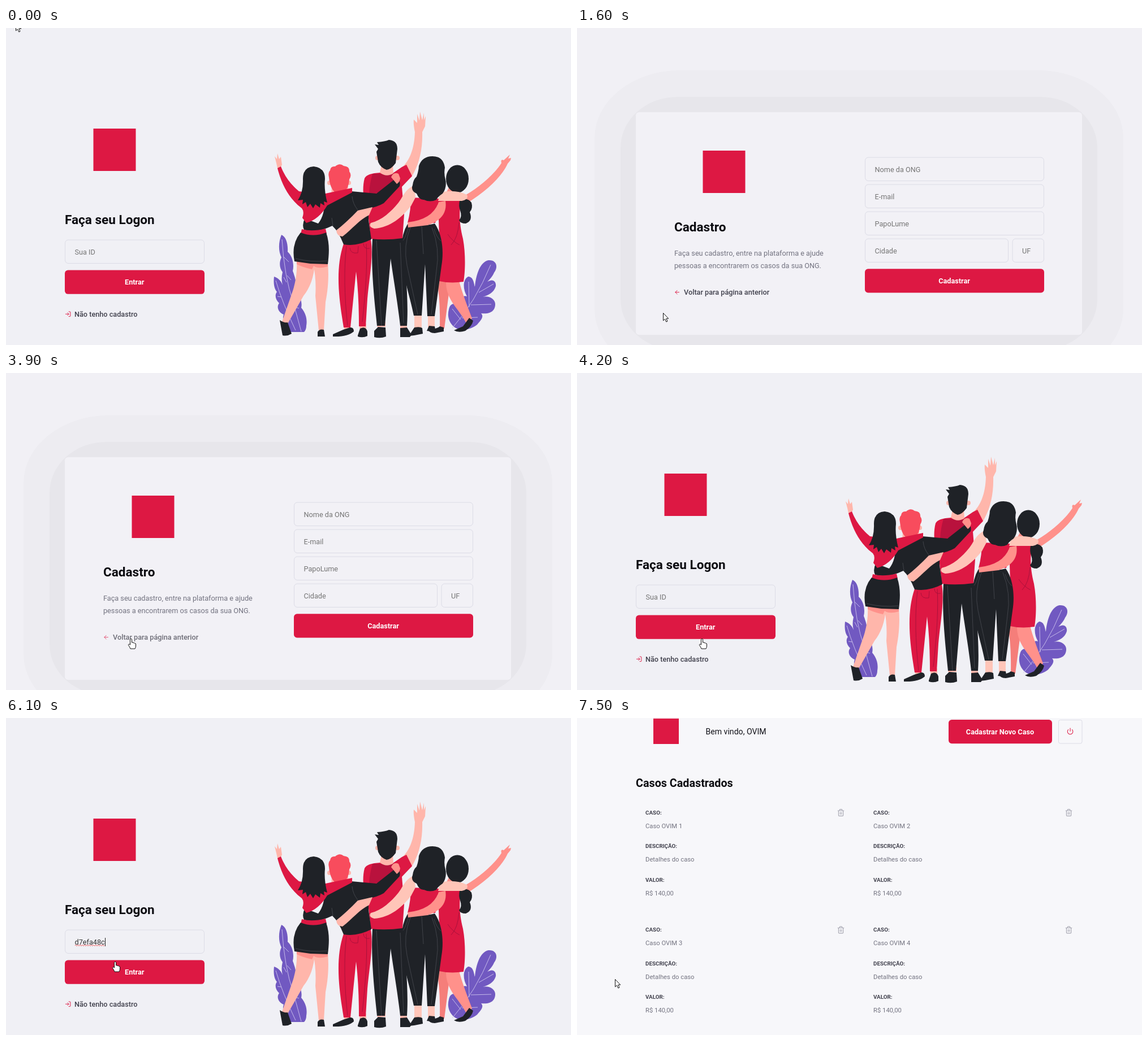
An HTML page that plays this animation: 999 by 561 pixels, repeating every 8000 ms.

```html
<!DOCTYPE html>
<html lang="pt-BR">
<head>
<meta charset="utf-8">
<title>Logon</title>
<style>
html, body { margin: 0; width: 100%; height: 100%; overflow: hidden; background: #f0f0f5; }
svg { display: block; }
text { font: 12.68px Roboto, sans-serif; fill: #737380; white-space: pre; }
.title { font-size: 22.54px; font-weight: 700; fill: #0b0b10; }
.link text { font-weight: 500; fill: #41414d; }
.btn text { font-weight: 700; fill: #fff; text-anchor: middle; }
.hint { fill: #757575; }
.label { font-size: 9.86px; font-weight: 700; fill: #41414d; }
.value { font-size: 11.27px; }
.field { fill: none; stroke: #dcdce6; }
.red { fill: #dd1843; }
.ink { fill: #1f2227; }
.pink { fill: #ffb6ab; }
.light { fill: #ffc5b8; }
.coral { fill: #ff918b; }
.leaf { fill: #7159c1; }
.icon { fill: none; stroke: #dd1843; stroke-width: 2; stroke-linecap: round; stroke-linejoin: round; }
.vein, .seam, .fold { fill: none; stroke: #cfc4ee; stroke-width: .9; }
.seam { stroke: #44474d; }
.fold { stroke: #a5103a; }
</style>
</head>
<body>
<svg width="999" height="561" viewBox="0 0 999 561">
<rect id="bg" width="999" height="561"/>

<g id="login">
  <rect class="red" x="154.5" y="178" width="75" height="75"/>
  <text class="title" x="104" y="347">Faça seu Logon</text>
  <rect class="field" x="104.5" y="375" width="246" height="41.5" rx="5.6"/>
  <text id="idText" x="121.5" y="400.5"></text>
  <path id="wave" fill="none" stroke="#e33" stroke-width=".9"/>
  <rect id="caret" y="389" width="1" height="15" fill="#222"/>
  <g class="btn" id="enter">
    <rect class="red" x="104" y="428.6" width="247" height="42.2" rx="5.6"/>
    <text x="227.3" y="454">Entrar</text>
  </g>
  <g class="link" id="signup">
    <path class="icon" transform="translate(104 500.6) scale(.47)" d="M15 3h4a2 2 0 0 1 2 2v14a2 2 0 0 1-2 2h-4M10 17l5-5-5-5M15 12H3"/>
    <text x="121" y="511">Não tenho cadastro</text>
  </g>

  <!-- leaves -->
  <path class="leaf" d="M487 366C495 369 499 382 498 396C506 403 510 417 507 430C512 443 515 456 514 470C521 476 524 486 522 495C530 504 533 516 531 527Q531 534 527 538H503C494 530 487 518 491 507C481 503 478 493 483 487C476 480 475 472 479 467C473 460 473 448 474 440C481 442 487 448 489 455Q486 444 489 432C483 424 483 414 487 406C481 394 482 378 487 366Z"/>
  <path class="vein" d="M488 374Q492 440 508 486L522 537M477 447Q488 485 512 535M491 405l9 9M497 438l7 8M505 472l7 2M496 450l-5-9M508 493l10 3M487 476l-7-1"/>
  <path class="leaf" d="M783 498C786 484 797 487 803 493C800 480 808 472 815 475C807 461 808 445 817 440C826 440 827 450 829 458C831 437 838 414 853 411C867 410 871 422 863 433C860 440 856 444 851 449C861 443 867 448 866 457C863 468 853 473 843 476C855 473 866 481 865 490C864 505 850 506 840 505C846 511 839 518 833 525C820 536 800 536 791 528C783 520 780 510 783 498Z"/>
  <path class="vein" d="M789 531Q830 485 857 419M819 494L818 449M836 468L862 453M822 490L858 489M804 516L789 497M806 513L834 512"/>

  <!-- woman in the dress -->
  <path class="coral" d="M806 299C832 286 862 261 876 239Q874 231 880 234L891 224L888 231L893 230L892 234L887 240C878 261 850 289 815 310Z"/>
  <path fill="#f57e7a" d="M762 447H786L775 532H767Q768 480 762 447Z"/>
  <path class="coral" d="M778 447H801C806 467 815 490 824 514L814 523C801 496 777 482 778 447Z"/>
  <path class="ink" d="M747 531Q758 535 767 528L774 530V537L758 540Q746 540 747 531ZM792 535L808 528L819 513L826 518Q824 528 812 536Q800 540 792 535Z"/>
  <path class="red" d="M764 306L805 304C801 325 801 345 808 373C813 400 812 431 809 449Q782 453 757 446C767 424 770 399 766 370Z"/>
  <path class="fold" d="M801 344Q799 372 787 384M781 365Q790 378 802 384"/>
  <path class="ink" d="M802 306Q815 298 823 309Q826 319 820 326Q826 341 813 346Q803 346 801 340Q807 334 803 323Q800 315 802 306Z"/>
  <path class="coral" d="M784 280L801 288L807 303H773Z"/>
  <ellipse class="ink" cx="798" cy="267" rx="20" ry="24.5"/>

  <!-- tall man -->
  <path class="pink" d="M698 249C714 235 722 214 723 184Q720 170 721 162L727 168L727 152L731 164L732 148L736 163L739 150V163L742 156L741 174L736 184C737 218 729 245 716 265Z"/>
  <path class="pink" d="M656 529h15v-9h-15zM697 531h12v-9h-12z"/>
  <path class="ink" d="M648 372H703C706 430 712 480 709 527H697C693 490 686 450 680 408L670 527H656C650 470 645 420 648 372ZM651 536L658 529L671 530L672 546Q662 550 651 547ZM697 531L709 530L717 543L714 547H697Z"/>
  <path class="seam" d="M655 376L664 527M697 380L703 522"/>
  <path class="red" d="M634 266Q638 257 662 256L684 257L700 246L708 242L718 262L700 281L704 330L701 372Q672 376 645 373L640 328C632 310 629 285 634 266Z"/>
  <path fill="#b9123d" d="M648 258L688 257L692 274L652 294L642 293Q643 275 648 258Z"/>
  <path class="pink" d="M664 242H684L685 257Q673 265 661 256Z"/>
  <circle class="pink" cx="657" cy="230" r="4"/><circle class="pink" cx="692" cy="230" r="4"/>
  <path class="ink" d="M652 206L659 207L656 202Q670 201 677 198Q692 199 692 214L689 239Q681 250 673 251Q662 247 658 237L655 219L658 214Z"/>

  <!-- red-haired man -->
  <path class="pink" d="M598 534h11v-9h-11zM625 532h12v-9h-12z"/>
  <path class="red" d="M597 382L645 374C650 405 642 444 639 479L636 528H624C624 496 623 465 619 431L609 530H597C591 492 580 430 597 382Z"/>
  <path class="fold" d="M602 386Q595 445 604 527M608 389Q609 400 622 398L623 386M637 382Q640 430 630 520M632 381Q632 392 643 390"/>
  <path class="ink" d="M578 542L596 534L608 530Q615 529 615 537Q604 547 578 546ZM622 544L626 532Q636 527 639 537V545Q631 549 622 546Z"/>
  <path class="pink" d="M576 280H605V296H575Z"/>
  <circle class="pink" cx="572" cy="274" r="4"/><circle class="pink" cx="606" cy="274" r="4"/>
  <path fill="#f84c5d" d="M571 264Q569 256 573 252Q574 244 582 245Q590 238 597 244Q608 245 607 254Q612 260 607 268Q606 284 597 291Q589 294 582 291Q573 284 571 264Z"/>
  <path class="ink" d="M563 305L611 289L655 293L688 267Q699 269 696 280L668 310Q656 317 641 319L641 340L646 374Q621 387 597 383Q588 360 577 350Q548 364 527 357Q523 350 528 337L552 346Q564 331 563 305Z"/>
  <path class="seam" d="M622 322Q613 311 612 298M576 336L578 350"/>
  <path class="coral" d="M681 264Q685 254 694 258L697 266Q696 273 691 276Z"/>
  <path class="pink" d="M622 323L648 317L642 331C625 339 612 356 595 369Q585 369 584 358Q602 344 622 323Z"/>

  <!-- woman in the skirt -->
  <path class="pink" d="M480 248L478 239L475 227L479 232L480 222L483 232L486 228L488 242L485 248Z"/>
  <path class="pink" d="M514 411L546 416C545 440 537 461 526 474L497 525L488 520L504 474C512 452 515 435 514 411ZM543 416H569C572 448 567 475 565 485L562 535H553L547 474Q549 445 543 416Z"/>
  <path class="coral" d="M514 411L569 415V422Q552 427 544 421L541 427Q526 424 514 418Z"/>
  <path class="ink" d="M484 517Q491 522 498 521L505 541Q497 546 489 544ZM551 538Q554 532 562 534L564 546H551Z"/>
  <path class="red" d="M480 248L486 245Q496 271 518 289L560 294L612 283V291L568 314Q553 339 531 345L524 336Q528 325 523 319Q492 296 480 248ZM523 356Q541 361 565 355L567 364Q544 371 521 365Z"/>
  <path class="ink" d="M521 362Q543 371 566 362C573 382 571 401 569 418L538 417L510 413Q504 382 521 362Z"/>
  <path class="seam" d="M512 408Q540 415 568 412"/>
  <path class="ink" d="M525 267Q525 246 544 245Q564 247 564 267Q562 286 568 309L562 307L563 314L556 310L555 318L547 312L543 319L538 311L533 317L530 308L524 312L525 304L516 305Q526 290 525 267Z"/>

  <!-- long-haired woman -->
  <path class="light" d="M722 508h13v23h-13zM746 508h12v22h-12z"/>
  <path class="ink" d="M712 545L722 530Q732 528 736 531L737 541Q724 544 712 545ZM744 536L748 527L758 528L760 538Z"/>
  <path class="red" d="M716 300L766 302Q765 326 759 345H710Q716 322 716 300Z"/>
  <path class="ink" d="M710 347Q736 352 758 346C770 363 775 391 770 421L758 510H745L741 418L735 509H721C714 473 698 430 699 390Q700 363 710 347Z"/>
  <path class="seam" d="M715 353Q702 385 709 420L728 507M753 353Q768 390 761 430L752 507M735 351L738 400M712 352Q706 372 702 376M757 356Q761 370 769 377"/>
  <path class="light" d="M722 279C706 284 702 299 694 309C681 325 665 340 645 345Q640 352 651 355C680 353 701 334 716 315L724 300ZM768 291Q794 285 815 295Q819 303 806 306L764 306Z"/>
  <path class="coral" d="M765 308L777 306C781 331 764 343 745 349L711 353L710 344Q755 339 765 308Z"/>
  <path class="ink" d="M754 227Q773 227 776 247Q774 258 777 268Q780 282 772 293Q764 298 761 304Q750 309 739 304Q731 305 726 293Q715 288 719 278Q720 268 726 263Q730 251 730 244Q736 227 754 227Z"/>
</g>

<g id="register">
  <rect x="31" y="75" width="935" height="542" rx="150" ry="120" fill="#edecf1"/>
  <rect x="77" y="122" width="843" height="448" rx="100" ry="90" fill="#e7e6eb"/>
  <rect x="104" y="149" width="789" height="394" rx="5.6" fill="#f2f1f6"/>
  <rect class="red" x="222.5" y="217" width="75" height="75"/>
  <text class="title" x="172" y="360">Cadastro</text>
  <text x="172" y="403">Faça seu cadastro, entre na plataforma e ajude</text>
  <text x="172" y="425">pessoas a encontrarem os casos da sua ONG.</text>
  <g class="link" id="back">
    <path class="icon" transform="translate(171.5 462) scale(.47)" d="M19 12H5M12 19l-7-7 7-7"/>
    <text x="189" y="472">Voltar para página anterior</text>
  </g>
  <g id="fields"></g>
  <g class="btn">
    <rect class="red" x="509" y="426.3" width="317" height="42.2" rx="5.6"/>
    <text x="667" y="452">Cadastrar</text>
  </g>
</g>

<g id="profile">
  <rect class="red" x="135" y="1" width="45" height="45"/>
  <text x="227.5" y="29" style="font-size:14.1px;fill:#13131a">Bem vindo, OVIM</text>
  <g class="btn">
    <rect class="red" x="657" y="3" width="183" height="42.2" rx="5.6"/>
    <text x="748" y="28.5">Cadastrar Novo Caso</text>
  </g>
  <rect class="field" x="851.5" y="3.5" width="41.5" height="41.5" rx="3"/>
  <path class="icon" transform="translate(865.7 17) scale(.53)" d="M18.36 6.64a9 9 0 1 1-12.73 0M12 2v10"/>
  <text class="title" x="104" y="121.5" style="font-size:19.73px">Casos Cadastrados</text>
  <g id="cases"></g>
</g>

<g id="cursor" fill="#fff" stroke="#111" stroke-linejoin="round">
  <path id="arrow" d="M.5 .5V13.8L3.5 11L5.8 16L8 15L5.8 10.2H9.7Z"/>
  <path id="hand" d="M-1.5 11V1.3Q0-.8 1.5 1.3V7Q3 5.8 4 7.6Q5.7 6.6 6.5 8.4Q8.5 8 8.5 10V13Q8.5 15.5 7 18H-1Q-2 15-4.7 11.4Q-4.5 8.5-1.5 11Z"/>
  <path id="beam" fill="none" d="M-3-8H-1L0-7L1-8H3M0-7V7M-3 8H-1L0 7L1 8H3"/>
</g>
</svg>

<script>
const LOOP = 8000, STEP = 100;
const $ = id => document.getElementById(id);
const show = (id, on) => $(id).style.display = on ? '' : 'none';
const label = (x, y, cls, s) => `<text x="${x}" y="${y}" class="${cls}">${s}</text>`;

const field = ([x, y, w, s]) =>
  `<rect class="field" x="${x + .5}" y="${y}" width="${w - 1}" height="41.5" rx="5.6"/>` + label(x + 17.5, y + 25.7, 'hint', s);
$('fields').innerHTML = [
  [509, 229, 317, 'Nome da ONG'], [509, 277, 317, 'E-mail'], [509, 325, 317, 'PapoLume'],
  [509, 373, 254, 'Cidade'], [769.5, 373, 56.5, 'UF']
].map(field).join('');

const trash = 'M3 6h18M19 6v14a2 2 0 0 1-2 2H7a2 2 0 0 1-2-2V6m3 0V4a2 2 0 0 1 2-2h4a2 2 0 0 1 2 2v2M10 11v6M14 11v6';
$('cases').innerHTML = [0, 1, 2, 3].map(i => {
  const x = 121 + i % 2 * 403, y = 170.5 + (i >> 1) * 207.5;
  const rows = [['CASO:', `Caso OVIM ${i + 1}`], ['DESCRIÇÃO:', 'Detalhes do caso'], ['VALOR:', 'R$ 140,00']];
  return rows.map(([name, value], k) =>
    label(x, y + k * 59.6, 'label', name) + label(x, y + 24 + k * 59.6, 'value', value)).join('') +
    `<path class="icon" style="stroke:#a8a8b3" transform="translate(${x + 338.5} ${y - 10}) scale(.587)" d="${trash}"/>`;
}).join('');

$('wave').setAttribute('d', 'M122 402.5' + 'q1-2 2 0t2 0'.repeat(13));

// Pointer moves: start, end, x, y
const moves = [
  [0, 0, 17, -9], [500, 1300, 152, 504], [2100, 2200, 113, 506], [2700, 2800, 72, 469],
  [3400, 3400, 85, 476], [3500, 3900, 221, 470], [4700, 5100, 193, 396],
  [6100, 6100, 193, 431], [6300, 6500, 184, 448], [7300, 7500, 67, 462]
];

function pointer(t) {
  let x = 0, y = 0;
  for (const [from, to, toX, toY] of moves) {
    if (t < from) break;
    const p = Math.min(1, (t - from + STEP) / (to - from + STEP));
    const e = p * p * (3 - 2 * p);
    x += (toX - x) * e;
    y += (toY - y) * e;
  }
  return [x, y];
}

function draw(now) {
  const t = Math.floor(now % LOOP / STEP) * STEP;
  const within = (a, b) => t >= a && t < b;

  const page = within(1600, 4200) ? 'register' : t >= 6900 ? 'profile' : 'login';
  for (const id of ['login', 'register', 'profile']) show(id, id === page);
  $('bg').setAttribute('fill', { login: '#f0f0f5', register: '#f1f0f5', profile: '#f7f7fa' }[page]);

  $('signup').style.opacity = within(1300, 1600) ? .75 : 1;
  $('back').style.opacity = within(3800, 4200) ? .75 : 1;
  const dim = within(4700, 4900) ? .95 : t >= 6300 ? Math.max(.9, .95 - (t - 6300) / 4000) : 1;
  $('enter').style.filter = dim < 1 ? `brightness(${dim})` : 'none';

  const filled = t >= 5800;
  $('idText').textContent = filled ? 'd7efa48c' : 'Sua ID';
  $('idText').style.fill = filled ? '#333' : '#757575';
  show('wave', within(5800, 6700));
  show('caret', within(5100, 5600) || within(5800, 6300));
  $('caret').setAttribute('x', filled ? 175 : 121);

  const hand = within(1300, 1500) || within(3800, 4400) || within(4700, 4900) || within(6100, 6700);
  const beam = within(5000, 5800);
  show('cursor', !within(5800, 6100));
  show('hand', hand);
  show('beam', beam);
  show('arrow', !hand && !beam);
  $('cursor').setAttribute('transform', `translate(${pointer(t).map(Math.round)})`);
}

const start = performance.now();
function tick() {
  draw(performance.now() - start);
  requestAnimationFrame(tick);
}
tick();
</script>
</body>
</html>
```
